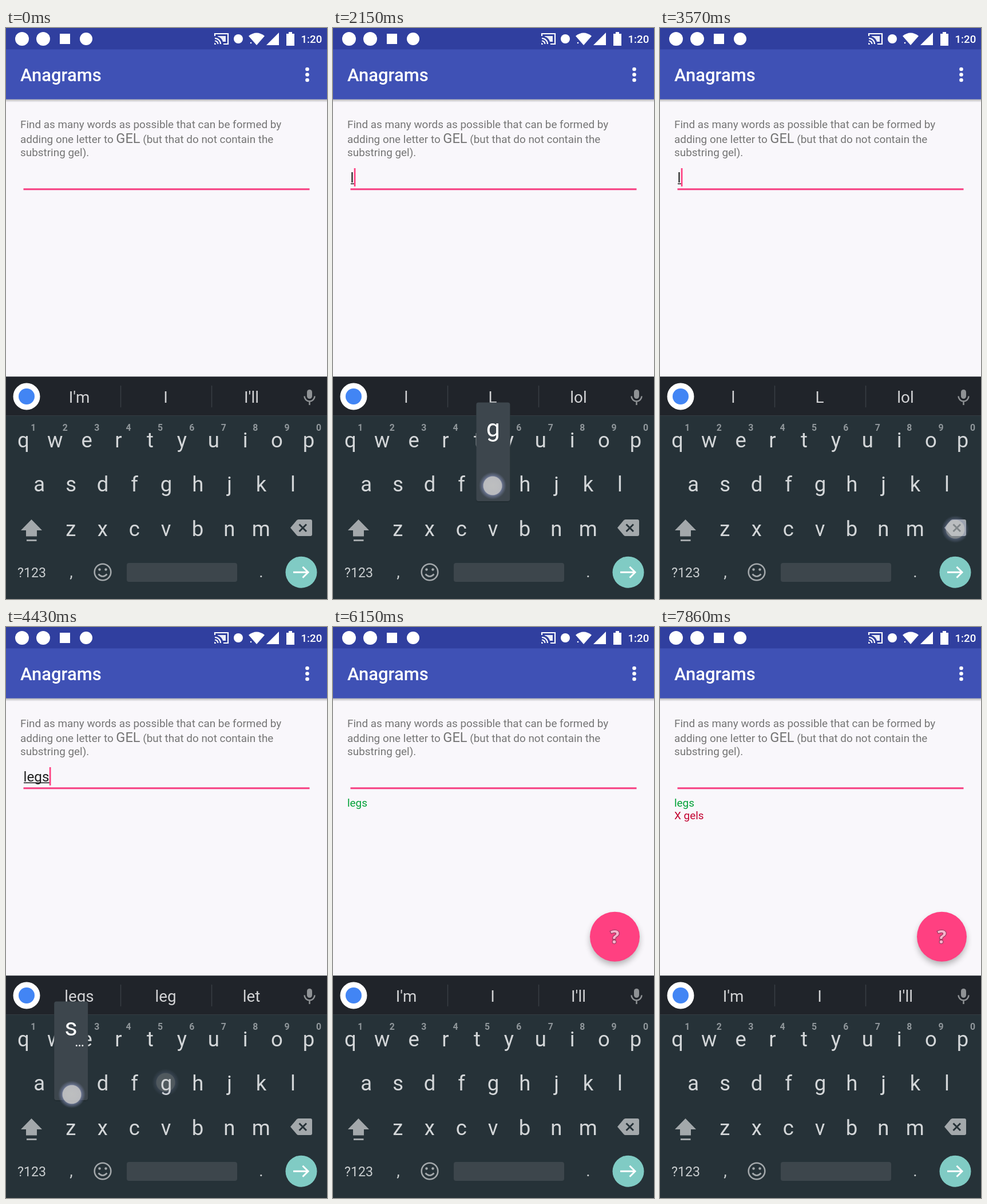
Recreate the animation shown at these times as an HTML page. Size 561 by 998 pixels, loop 8 s.

```html
<!DOCTYPE html>
<html lang="en">
<head>
<meta charset="utf-8">
<title>Anagrams</title>
<style>
  html, body { margin: 0; width: 100%; height: 100%; overflow: hidden; background: #f9f7fb; }
  svg { display: block; width: 100%; height: 100%; font-family: Roboto, sans-serif; }
  .mid { text-anchor: middle; }
  .body { font-size: 18.9px; fill: #757575; }
  .key { font-size: 36.5px; fill: #d3d6d8; }
  .hint { font-size: 15.8px; font-weight: 700; fill: #90979b; }
  .tip { font-size: 27.8px; fill: #d2d3d5; }
</style>
</head>
<body>
<svg viewBox="0 0 561 998">
  <defs>
    <linearGradient id="barShadow" x2="0" y2="1">
      <stop stop-color="#000" stop-opacity=".3"/>
      <stop offset="1" stop-color="#000" stop-opacity="0"/>
    </linearGradient>
    <radialGradient id="touch">
      <stop stop-color="#d4d4d4"/>
      <stop offset=".66" stop-color="#cfcfd2"/>
      <stop offset=".72" stop-color="#8c97c4" stop-opacity=".6"/>
      <stop offset="1" stop-color="#8c97c4" stop-opacity="0"/>
    </radialGradient>
    <filter id="soft" x="-30%" y="-30%" width="160%" height="160%"><feGaussianBlur stdDeviation="6"/></filter>
  </defs>

  <rect width="561" height="998" fill="#f9f7fb"/>
  <rect y="124" width="561" height="6" fill="url(#barShadow)"/>
  <rect width="561" height="124.600" fill="#3f51b5"/>
  <rect width="561" height="37.400" fill="#303f9f"/>

  <!-- status bar -->
  <g fill="#fff">
    <circle cx="28" cy="19" r="12"/>
    <circle cx="65" cy="19" r="12"/>
    <rect x="94" y="10" width="18" height="18"/>
    <circle cx="140" cy="19" r="11"/>
    <circle cx="406" cy="19" r="8"/>
    <path d="M424 14Q438 3 452 14L438 30Z"/>
    <path d="M477 8V30H455Z"/>
    <path d="M490 10H494V7H500V10H504V31H490Z"/>
    <circle cx="428" cy="26" r="1.300"/>
    <text x="515.500" y="26" font-size="18.7" font-weight="500">1:20</text>
    <g fill="none" stroke="#fff" stroke-width="2.200">
      <path d="M365 14V10H388V28H380"/>
      <path d="M365 18A10 10 0 0 1 375 28M365 22.500A5.500 5.500 0 0 1 370.500 28"/>
    </g>
    <path d="M364 26A3 3 0 0 1 367 29H364ZM370 14H384V24H379Q377 17 370 15Z" fill-opacity=".9"/>
  </g>

  <!-- app bar -->
  <g fill="#fff">
    <text x="25" y="93" font-size="31" font-weight="500">Anagrams</text>
    <circle cx="526.500" cy="72" r="3.300"/>
    <circle cx="526.500" cy="81.500" r="3.300"/>
    <circle cx="526.500" cy="91" r="3.300"/>
  </g>

  <text class="body" x="25" y="175">Find as many words as possible that can be formed by</text>
  <text class="body" x="25" y="201">adding one letter to <tspan font-size="23.6">GEL</tspan> (but that do not contain the</text>
  <text class="body" x="25" y="224">substring gel).</text>

  <text id="entry" x="30.500" y="270" font-size="24.3" fill="#212121"></text>
  <rect id="under" x="31" y="271.500" height="1.600" fill="#212121"/>
  <rect x="30.500" y="280.300" width="500" height="3" fill="#f73d80"/>
  <rect id="caret" y="245" width="2.700" height="32" fill="#ff4081"/>

  <text id="right" class="body" x="25" y="314" style="fill:#00a136">legs</text>
  <text id="wrong" class="body" x="25" y="336" style="fill:#c2002f">X gels</text>

  <g id="fab">
    <circle cy="6" r="42.500" fill="#000" opacity=".3" filter="url(#soft)"/>
    <circle r="43.500" fill="#ff4081"/>
    <text class="mid" y="11.500" font-size="33" font-weight="700" font-family="Open Sans, sans-serif"
      fill="#fbb3cc" stroke="#8d3a5c" stroke-width="2.200" paint-order="stroke">?</text>
  </g>

  <!-- keyboard -->
  <rect y="609.500" width="561" height="389" fill="#263238"/>
  <rect y="609.500" width="561" height="67.500" fill="#20242a"/>
  <rect y="677" width="561" height="1" fill="#343d43"/>
  <path d="M200.500 625V663M359.500 625V663" stroke="#383e44" stroke-width="1.500"/>
  <circle cx="36" cy="644" r="23.500" fill="#fff"/>
  <circle cx="36" cy="644" r="14" fill="#4285f4"/>
  <g id="tips"></g>
  <g fill="none" stroke="#8f9295" stroke-width="2.500">
    <rect x="526" y="632" width="9" height="16" rx="4.500" fill="#8f9295" stroke="none"/>
    <path d="M521.500 643.500A9 9 0 0 0 539.500 643.500M530.500 652.500V659"/>
  </g>
  <g id="keys"></g>
  <g fill="#a3a8ab">
    <path d="M44.500 859L63 878H54V888.500H35V878H26ZM36 894H53.500V897H36Z"/>
    <path d="M497 873.500L508 860.500Q509.500 859 511 859H532Q535 859 535 862V885Q535 888 532 888H511Q509.500 888 508 886.500Z"/>
    <path d="M512.500 867.500L525 880M525 867.500L512.500 880" stroke="#263238" stroke-width="3"/>
    <circle cx="163.500" cy="946.500" r="2.200"/>
    <circle cx="174.500" cy="946.500" r="2.200"/>
    <g fill="none" stroke="#a3a8ab" stroke-width="2.600">
      <path d="M161.500 954.500Q169 962.500 176.500 954.500"/>
      <circle cx="169" cy="951" r="14.300"/>
    </g>
  </g>
  <text x="20" y="960" font-size="23.2" fill="#c9cdcf">?123</text>
  <text class="mid" x="114" y="960" font-size="28" fill="#c9cdcf">,</text>
  <text class="mid" x="446" y="960" font-size="28" fill="#c9cdcf">.</text>
  <rect x="211" y="935" width="193" height="33" rx="4" fill="#3d464c"/>
  <circle cx="516" cy="951.200" r="27.500" fill="#80cbc4"/>
  <path d="M502 951.200H528M518.500 941.700L528 951.200L518.500 960.700" fill="none" stroke="#fff" stroke-width="3"/>

  <g id="popups"></g>
  <g id="dots"></g>
</svg>
<script>
const LOOP = 8000, TICK = 1000 / 7;
const POPUP_HOLD = 140, FADE = 280;
const $ = id => document.getElementById(id);

function add(parent, tag, attrs, text = '') {
  const node = document.createElementNS('http://www.w3.org/2000/svg', tag);
  for (const name in attrs) node.setAttribute(name, attrs[name]);
  node.textContent = text;
  return parent.appendChild(node);
}
const show = (node, on) => node.setAttribute('visibility', on ? 'visible' : 'hidden');

// Letter keys
const keyAt = {};
[['qwertyuiop', 30.3, 733], ['asdfghjkl', 58.3, 810], ['zxcvbnm', 113.4, 888]].forEach(([row, left, base], r) => {
  [...row].forEach((letter, i) => {
    const x = left + i * 55.4;
    keyAt[letter] = { x, base };
    add($('keys'), 'text', { class: 'key mid', x, y: base }, letter);
    if (r === 0) add($('keys'), 'text', { class: 'hint mid', x: x + 17.6, y: 704 }, (i + 1) % 10);
  });
});

// Touches: key, press, release, contact point
const touches = [
  ['l', 1660, 1800, 495, 815], ['g', 2090, 2210, 279, 800], ['s', 2390, 2480, 110, 811],
  ['del', 3230, 3300, 516, 876], ['del', 3390, 3460, 516, 876],
  ['e', 4060, 4140, 141, 728], ['g', 4160, 4230, 279, 796], ['s', 4360, 4480, 115, 817],
  ['enter', 4520, 4690, 515, 952],
  ['g', 6230, 6360, 279, 800], ['e', 6520, 6640, 141, 728], ['l', 6800, 6880, 490, 819],
  ['s', 6960, 7080, 105, 809], ['enter', 7240, 7400, 515, 952]
].map(([key, press, release, cx, cy]) => ({
  press, release,
  popup: keyAt[key] && makePopup(key),
  dot: add($('dots'), 'circle', { cx, cy, r: 24, fill: 'url(#touch)' })
}));

function makePopup(letter) {
  const { x, base } = keyAt[letter];
  const group = add($('popups'), 'g', {});
  add(group, 'rect', { x: x - 30, y: base - 154, width: 60, height: 173, rx: 5, fill: '#1c262b', opacity: .5 });
  add(group, 'rect', { x: x - 29.5, y: base - 155.5, width: 59, height: 172.5, rx: 4, fill: '#3d464d' });
  add(group, 'text', { class: 'mid', x, y: base - 96, 'font-size': 43, fill: '#fff' }, letter);
  const hint = { s: '...', e: '3' }[letter];
  if (hint) add(group, 'text', { class: 'mid', x: x + 15, y: base - 77, 'font-size': 18, 'font-weight': 700, fill: '#fff' }, hint);
  return group;
}

// Typed text over time, with the suggestions for it
const typed = [
  [0, ''], [1850, 'l'], [2280, 'lg'], [2560, 'lgs'], [3280, 'lg'], [3420, 'l'],
  [4140, 'le'], [4280, 'leg'], [4420, 'legs'], [4710, ''],
  [6420, 'g'], [6710, 'ge'], [6990, 'gel'], [7140, 'gels'], [7420, '']
];
const guesses = {
  '': ["I'm", 'I', "I'll"], l: ['l', 'L', 'lol'], lg: ['lg', 'leg', 'let'], lgs: ['lgs', 'LGS', 'lg'],
  le: ['le', 'let', 'leave'], leg: ['leg', 'let', 'legs'], legs: ['legs', 'leg', 'let'],
  g: ['g', 'good', 'go'], ge: ['ge', 'get', 'getting'], gel: ['gel', 'get', 'getting'], gels: ['gels', 'gel', 'gets']
};
const tips = [128, 279, 429].map(x => add($('tips'), 'text', { class: 'tip mid', x, y: 655 }));
const caretOff = [[0, 425], [995, 1565], [2995, 3280], [3850, 4140], [5140, 5565], [6140, 6420], [7850, LOOP]];

function draw(time) {
  const t = Math.floor((time + 5) / TICK) * TICK;
  const text = typed.filter(([start]) => t >= start).pop()[1];
  $('entry').textContent = text;
  const width = text ? $('entry').getComputedTextLength() : 0;
  $('under').setAttribute('width', width);
  $('caret').setAttribute('x', 30.8 + width);
  show($('caret'), !caretOff.some(([from, to]) => t >= from && t < to));
  tips.forEach((tip, i) => tip.textContent = guesses[text][i]);

  show($('right'), t >= 4710);
  show($('wrong'), t >= 7420);
  const grow = Math.min(1, Math.max(0, (t - 4690) / 220));
  const scale = 1 - (1 - grow) ** 2;
  show($('fab'), grow > 0);
  $('fab').setAttribute('transform', `translate(492.5 541.3) scale(${scale})`);

  for (const { press, release, popup, dot } of touches) {
    const fade = Math.max(0, 1 - Math.max(0, t - release) / FADE);
    dot.setAttribute('opacity', t < press ? 0 : .85 * fade);
    if (popup) show(popup, t >= press && t < release + POPUP_HOLD);
  }
}

const begin = performance.now();
function frame() {
  draw((performance.now() - begin) % LOOP);
  requestAnimationFrame(frame);
}
frame();
</script>
</body>
</html>
```
